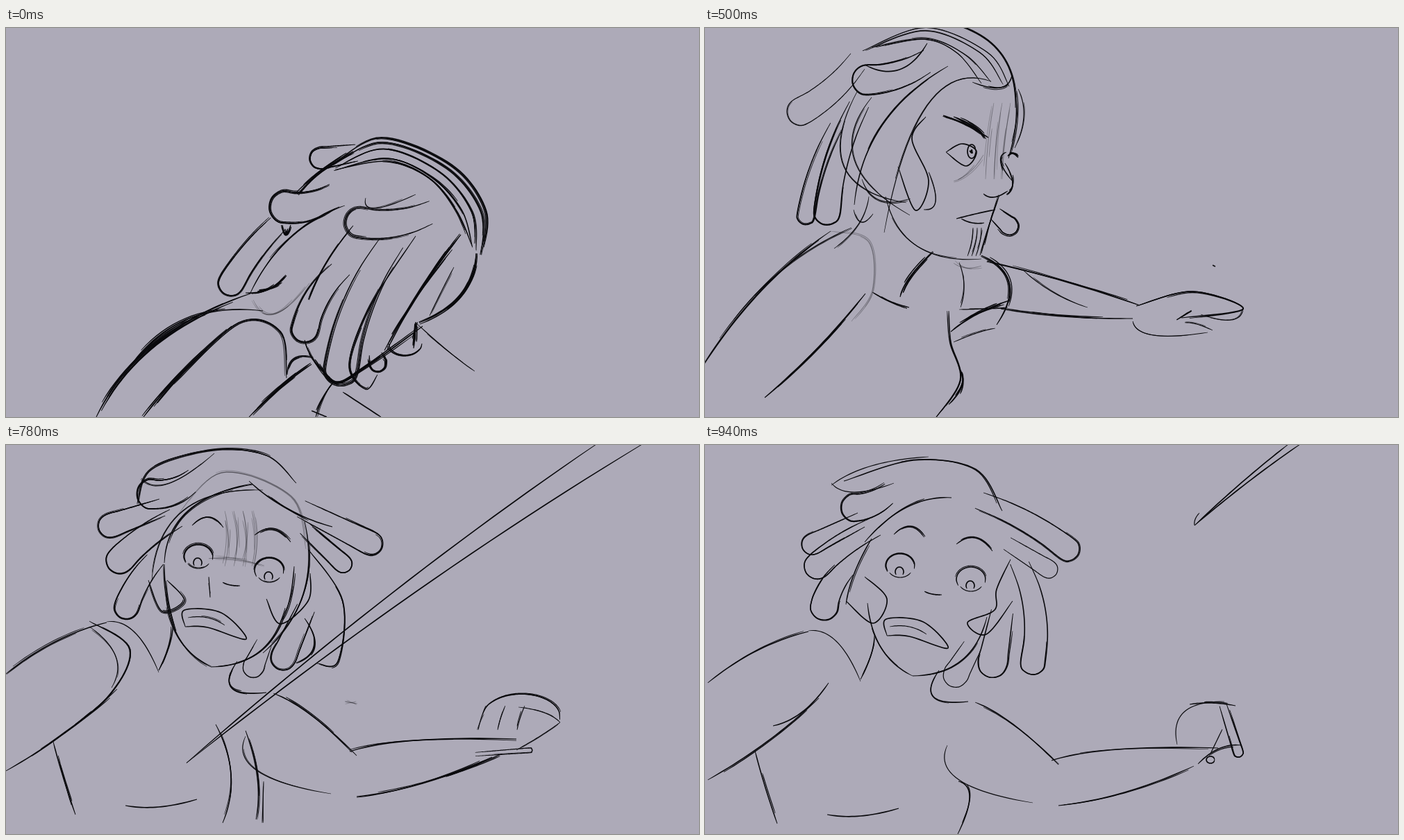
Animation, 998 px wide and 561 px high, one loop 980 ms. Source, as an HTML page with a canvas:

```html
<!DOCTYPE html>
<html lang="en">
<head>
<meta charset="utf-8">
<title>Rough sketch animation</title>
<style>
html, body { margin: 0; width: 100%; height: 100%; overflow: hidden; background: #adaab8; }
canvas { display: block; }
</style>
</head>
<body>
<canvas id="stage" width="998" height="561"></canvas>
<script>
const W = 998, H = 561, LOOP = 980;
const view = document.getElementById('stage').getContext('2d');
let g, seed, loose;

const lerp = (a, b, t) => a + (b - a) * t;
const rnd = (a = 0, b = 1) => {
  seed = (seed * 16807) % 2147483647;
  return lerp(a, b, seed / 2147483647);
};

// Smooth curve through x,y pairs: an arc for three points, a spline for more
function curve(p) {
  const out = [], last = p.length / 2 - 1;
  if (last === 2) {
    for (let i = 0; i <= 24; i++) {
      const t = i / 24, a = (1 - t) * (1 - 2 * t), b = 4 * t * (1 - t), c = t * (2 * t - 1);
      out.push([0, 1].map(j => a * p[j] + b * p[j + 2] + c * p[j + 4]));
    }
    return out;
  }
  const at = (i, j) => p[2 * Math.max(0, Math.min(last, i)) + j];
  for (let i = 0; i < last; i++)
    for (let s = 0; s < 12; s++) {
      const t = s / 12;
      out.push([0, 1].map(j => {
        const a = at(i - 1, j), b = at(i, j), c = at(i + 1, j), d = at(i + 2, j);
        return b + t / 2 * (c - a + t * (2 * a - 5 * b + 4 * c - d + t * (3 * (b - c) + d - a)));
      }));
    }
  out.push([at(last, 0), at(last, 1)]);
  return out;
}

// Moves each point sideways by offset(i)
function shiftSide(c, offset) {
  return c.map(([x, y], i) => {
    const a = c[Math.max(0, i - 1)], b = c[Math.min(c.length - 1, i + 1)];
    const dx = b[0] - a[0], dy = b[1] - a[1], d = offset(i) / (Math.hypot(dx, dy) || 1);
    return [x - dy * d, y + dx * d];
  });
}

// A line that is thin at both ends, like a pressed pen
function stroke(c, w) {
  const n = c.length - 1;
  const r = i => Math.max(w, 1) / 2 * (.5 + .5 * Math.min(1, 3 * Math.sin(Math.PI * i / n)));
  g.fillStyle = `rgba(9,9,12,${Math.min(1, w * .85)})`;
  g.beginPath();
  shiftSide(c, r).concat(shiftSide(c, i => -r(i)).reverse()).forEach(q => g.lineTo(...q));
  g.fill();
}

// A pen goes over the line once, then retraces random stretches of it
const pen = (w, passes, spread) => (...p) => {
  const c = curve(p), n = c.length - 1;
  stroke(c, w);
  for (let i = 0; i < Math.round(passes * loose); i++) {
    const part = c.slice(Math.floor(rnd(0, .35) * n), Math.ceil(rnd(.65, 1) * n) + 1);
    const a = rnd(-spread, spread), b = rnd(-spread, spread);
    stroke(shiftSide(part, j => lerp(a, b, j / part.length)), w * rnd(.6, .9));
  }
};
const clean = pen(1.7, 0, 0), thin = pen(1.2, 1, 2), firm = pen(1.6, 2, 2.6);
const heavy = pen(2, 4, 3.5), faint = pen(.4, 3, 4);

// Round-ended lock of hair from its root to its tip
function lock(ink, x0, y0, x1, y1, width, bend = 0) {
  const len = Math.hypot(x1 - x0, y1 - y0), ux = (x1 - x0) / len, uy = (y1 - y0) / len;
  const h = width / 2, end = len - h, pts = [];
  const put = (along, side) => pts.push(x0 + ux * along - uy * side, y0 + uy * along + ux * side);
  const edge = (t, s) => put(t * end, 4 * bend * t * (1 - t) + s * h * (.75 + .25 * t));
  for (let t = 0; t < 1; t += .25) edge(t, 1);
  for (let a = 0; a <= 4; a++) put(end + h * Math.sin(a * Math.PI / 4), h * Math.cos(a * Math.PI / 4));
  for (let t = .75; t >= 0; t -= .25) edge(t, -1);
  ink(...pts);
}

// Part of an ellipse; from and to are in turns
function ring(ink, x, y, rx, ry, from = 0, to = 1) {
  const pts = [];
  for (let i = 0; i <= 8; i++) {
    const a = lerp(from, to, i / 8) * 2 * Math.PI;
    pts.push(x + rx * Math.cos(a), y + ry * Math.sin(a));
  }
  ink(...pts);
}

// Lines running between two edges, closer together near the edges
function band(ink, n, outer, inner) {
  for (let i = 0; i < n; i++) {
    const u = i / (n - 1), t = u * u * (3 - 2 * u);
    ink(...outer.map((v, j) => lerp(v, inner[j], t) + rnd(-2, 2)));
  }
}

function shifted(dx, dy, ...parts) {
  g.save();
  g.translate(dx, dy);
  parts.forEach(draw => draw());
  g.restore();
}

function bowedLow() {
  band(firm, 5, [470,198, 540,158, 640,198, 690,265, 686,328], [475,205, 550,194, 610,218, 650,262, 670,315]);
  heavy(420,240, 455,207, 500,178);
  lock(firm, 505,180, 437,190, 32);
  lock(firm, 470,243, 380,264, 48, -6);
  lock(firm, 392,282, 313,382, 36, 4);
  firm(352,382, 408,304, 488,256);
  heavy(398,284, 403,298, 410,284);
  heavy(345,382, 378,377, 404,357);
  faint(356,392, 388,412, 437,368);
  lock(firm, 612,266, 488,284, 44, -8);
  thin(518,245, 532,260, 590,240);
  firm(500,285, 462,338, 436,392);
  lock(firm, 482,348, 420,451, 40, 8);
  lock(firm, 555,310, 473,513, 48, 12);
  firm(590,300, 525,400, 494,485, 518,521, 535,500);
  heavy(655,298, 597,378, 545,465);
  thin(645,345, 628,378, 610,415);
  heavy(677,325, 655,385, 595,425);
  heavy(445,478, 475,512, 520,488, 600,430);
  ring(firm, 575,455, 24,17, 0, .5);
  heavy(587,462, 589,440, 590,424);
  thin(590,425, 638,467, 675,495);
  lock(firm, 532,470, 538,495, 24);
  firm(430,450, 445,482, 475,512);
  heavy(130,561, 215,455, 352,383);
  firm(165,510, 250,425, 370,408);
  heavy(198,561, 255,495, 325,430);
  firm(240,512, 335,425, 395,438, 404,505);
  heavy(350,561, 397,517, 440,485);
  firm(405,500, 415,477, 442,476);
  firm(470,512, 456,535, 446,561);
  clean(485,525, 540,561);
  clean(440,552, 462,561);
}

function bowedHigh() {
  band(firm, 6, [415,122, 510,112, 598,160, 630,230, 622,258], [418,150, 495,138, 560,166, 600,212, 608,245]);
  heavy(415,118, 418,142, 455,148);
  clean(567,137, 570,125, 577,119, 600,118);
  clean(530,350, 548,358, 567,363);
  clean(567,363, 567,386);
  firm(455,150, 425,160, 402,176);
  lock(firm, 425,180, 334,196, 42, -6);
  lock(firm, 352,225, 304,342, 32, 10);
  heavy(316,322, 335,270, 372,222);
  firm(347,325, 375,290, 400,258);
  firm(416,206, 393,285, 397,368);
  heavy(290,334, 312,342, 338,336);
  heavy(297,355, 310,345, 328,338);
  lock(firm, 545,210, 424,230, 44, -10);
  lock(thin, 525,208, 434,230, 32, -8);
  heavy(446,285, 426,340, 398,372);
  lock(thin, 480,262, 442,424, 36, 8);
  lock(heavy, 540,252, 494,432, 40, 10);
  heavy(582,248, 538,330, 512,420);
  firm(615,255, 590,328, 522,390);
  heavy(388,342, 396,372, 412,360);
  heavy(395,365, 408,398, 430,428);
  firm(408,402, 438,438, 475,426);
  lock(firm, 525,370, 527,403, 18);
  heavy(375,458, 392,428, 420,408);
  firm(411,425, 407,490, 408,561);
  heavy(68,561, 150,455, 320,340);
  firm(240,388, 275,372, 308,345);
  heavy(130,561, 205,460, 290,380);
  firm(235,430, 315,368, 362,395, 345,480);
  heavy(250,561, 298,518, 345,478);
  firm(455,450, 505,500, 568,545);
  thin(472,470, 550,536, 640,561);
  firm(415,497, 480,527, 552,553);
}

function reach() {
  firm(0,485, 85,375, 185,290);
  thin(45,418, 122,340, 215,285);
  faint(185,290, 240,305, 245,375, 215,420);
  heavy(90,530, 163,462, 235,380);
  thin(240,240, 225,280, 190,315);
  heavy(285,385, 300,355, 333,320);
  firm(245,378, 270,391, 298,400);
  thin(370,335, 377,368, 372,400);
  firm(355,405, 358,450, 372,505, 335,561);
  heavy(370,488, 374,512, 355,540);
  heavy(402,325, 442,365, 424,425);
  heavy(358,435, 395,410, 442,390);
  thin(370,403, 405,402, 440,400);
  thin(362,450, 395,437, 422,430);
  faint(362,336, 380,343, 402,340);
  firm(410,333, 520,362, 630,397);
  thin(462,346, 505,378, 555,400);
  firm(430,402, 520,413, 620,416);
  firm(625,398, 706,377, 779,402, 690,415);
  thin(779,402, 762,418, 718,410);
  thin(620,420, 650,440, 728,436);
  thin(735,433, 712,424, 695,422);
  firm(683,418, 705,405);
  clean(735,339, 739,341);
}

function profile() {
  heavy(347,123, 380,137, 412,155);
  heavy(362,125, 392,140, 408,157);
  heavy(440,182, 447,178, 455,184);
  firm(438,176, 430,190, 446,217);
  firm(436,192, 447,220, 438,237);
  clean(405,236, 420,241, 440,232);
  firm(428,238, 412,285, 400,325);
  for (let x = 382; x < 398; x += 6) thin(x,326, x + 6,305, x + 8,285);
  for (let x = 412; x < 445; x += 12) faint(x + 8,105, x,160, x - 4,215);
  faint(362,218, 385,205, 405,180);
  thin(455,85, 463,125, 450,170);
  firm(449,80, 452,130, 441,185);
  thin(230,215, 255,245, 300,243);
  thin(264,240, 310,312, 402,330);
}

function glance() {
  reach();
  profile();
  band(firm, 4, [375,-8, 440,45, 452,105], [330,2, 390,30, 420,78]);
  thin(250,2, 350,10, 412,75);
  firm(398,70, 430,82, 437,66, 455,95);
  thin(245,10, 295,20, 345,-3);
  thin(325,18, 265,62, 230,50);
  thin(220,65, 290,92, 370,36);
  heavy(252,0, 228,25, 208,58);
  thin(170,78, 200,70);
  thin(112,80, 165,86, 218,48);
  lock(firm, 215,72, 118,116, 36, -8);
  lock(firm, 205,105, 157,281, 28, 8);
  thin(222,90, 182,200, 182,285);
  lock(firm, 380,60, 234,279, 34, 24);
  thin(250,70, 205,180, 300,265);
  faint(275,70, 232,160, 255,245);
  firm(306,148, 285,210, 245,275);
  clean(308,140, 305,185, 340,235, 328,262, 288,240, 278,205);
  thin(260,240, 265,265, 262,292);
  ring(clean, 373,175, 21,18, .5, 1.55);
  ring(clean, 386,173, 7,12);
  heavy(387,164, 387,176);
  thin(372,267, 400,272, 425,258);
  lock(thin, 412,264, 459,287, 24);
  thin(402,85, 405,112);
}

function glare() {
  shifted(-4, 3, reach, profile);
  band(thin, 4, [225,35, 320,0, 405,35, 440,85], [245,28, 315,18, 365,38, 400,78]);
  firm(365,-3, 428,40, 447,115);
  firm(385,78, 425,86, 442,68);
  clean(320,22, 280,60, 230,53);
  lock(firm, 320,48, 213,82, 44, -6);
  lock(thin, 220,48, 123,134, 40, -6);
  lock(firm, 190,140, 141,283, 26, 6);
  lock(firm, 222,110, 170,283, 38, 8);
  firm(350,55, 255,140, 215,255);
  thin(242,268, 225,280, 214,262);
  thin(220,90, 200,200, 290,252);
  thin(240,100, 215,190, 295,270);
  thin(412,77, 320,112, 258,295);
  clean(318,128, 298,160, 322,220, 303,263, 278,200);
  thin(322,208, 332,250, 315,262);
  clean(347,179, 370,167, 391,178, 376,199, 347,179);
  ring(clean, 384,178, 6,10);
  heavy(384,175, 385,181);
  clean(362,275, 390,268, 418,262);
  clean(369,275, 385,281, 402,281);
  lock(firm, 418,268, 448,294, 26);
}

function eye(x, y) {
  ring(firm, x, y, 21, 18, .42, 1.04);
  ring(thin, x, y, 19, 17, .1, .4);
  ring(clean, x - 1, y + 9, 6, 7, .4, 1.1);
}

// Face, neck and arms of the startled pose
function startled() {
  eye(277, 161);
  eye(379, 181);
  firm(268,116, 292,104, 313,119);
  firm(358,130, 385,121, 410,140);
  clean(312,198, 323,202, 337,203);
  clean(258,262, 257,238, 310,242, 346,280, 290,263, 258,262);
  thin(262,249, 290,249, 315,260);
  firm(230,215, 250,280, 295,320);
  firm(295,320, 365,298, 402,235);
  firm(240,262, 235,290, 220,325);
  thin(145,255, 185,270, 220,328);
  firm(333,312, 325,350, 375,357);
  firm(0,330, 70,284, 145,256);
  firm(0,470, 85,415, 160,352);
  firm(68,428, 82,478, 100,533);
  clean(172,520, 220,522, 275,511);
  firm(385,358, 440,390, 505,448);
  firm(495,442, 590,426, 735,424);
  firm(505,507, 600,488, 700,450);
  thin(345,420, 362,470, 468,503);
}

function shock() {
  startled();
  firm(190,85, 210,35, 298,8, 375,15, 418,55);
  lock(firm, 268,52, 190,78, 44, -6);
  thin(195,48, 235,55, 300,12);
  lock(firm, 225,90, 134,122, 34);
  lock(firm, 245,105, 148,178, 40, 4);
  lock(firm, 215,165, 164,249, 36, 4);
  firm(355,57, 262,95, 228,170);
  thin(370,65, 255,95, 210,195);
  faint(240,110, 310,40, 410,75, 432,150);
  firm(350,52, 405,92, 470,118);
  lock(firm, 425,92, 541,150, 34);
  lock(firm, 430,120, 495,180, 26);
  firm(435,150, 485,225, 478,312, 448,315);
  firm(430,110, 428,215, 370,300);
  firm(205,195, 225,240, 257,225, 232,195);
  clean(375,222, 395,258, 435,225, 438,185);
  lock(firm, 432,235, 392,323, 36);
  lock(thin, 372,285, 350,334, 30);
  firm(430,250, 444,290, 418,315);
  firm(228,172, 232,220, 245,268);
  firm(415,175, 408,225, 395,255);
  for (let x = 315; x < 360; x += 13) faint(x,95, x + 5,135, x,175);
  faint(292,164, 330,165, 372,174);
  thin(292,190, 294,220);
  firm(120,254, 178,295, 145,365, 60,432);
  thin(120,262, 158,305, 152,350);
  firm(302,403, 324,475, 312,545);
  firm(345,412, 362,480, 360,540);
  thin(371,485, 369,545);
  ring(firm, 742,392, 56,33, .52, 1.02);
  thin(738,378, 775,386, 798,400);
  thin(798,400, 772,418, 735,440);
  lock(thin, 676,446, 758,440, 7);
  for (let x = 685; x < 750; x += 28) thin(x + 6,376, x - 1,395, x - 5,411);
  firm(618,482, 665,466, 715,445);
  faint(488,370, 506,373);
}

function recoil() {
  shifted(4, 13, startled);
  firm(200,52, 300,22, 390,35, 428,95);
  thin(182,58, 240,30, 322,17);
  thin(182,55, 215,68, 272,55);
  lock(firm, 265,70, 198,98, 40, -4);
  lock(firm, 225,108, 141,150, 30);
  lock(firm, 245,118, 146,185, 38, 4);
  firm(230,140, 290,90, 355,76);
  lock(firm, 200,180, 162,250, 40, 4);
  firm(240,135, 215,185, 203,230);
  lock(firm, 395,80, 537,158, 34, -6);
  lock(thin, 435,142, 506,186, 26);
  lock(firm, 453,170, 475,331, 36, -12);
  clean(230,190, 262,222, 242,257, 203,225);
  clean(440,165, 420,208, 417,238, 378,256, 405,273, 443,225);
  lock(firm, 428,240, 410,335, 42);
  lock(thin, 385,290, 352,347, 36);
  clean(98,405, 140,385, 178,343);
  firm(365,485, 381,508, 364,561);
  thin(680,432, 690,385, 748,370);
  firm(698,374, 730,372, 764,376);
  lock(firm, 746,375, 770,450, 14);
  firm(772,433, 740,438, 710,460);
  ring(clean, 728,454, 6,5);
  thin(745,410, 728,445);
}

// Two edges running from the top of the stage, slightly bowed, to one point
function blade(x, y, ...tops) {
  tops.forEach(top => clean(top,-1, (top + x) / 2, y / 2 - .02 * Math.hypot(top - x, y), x,y));
}

// u = 0: point at the shoulder, u = 1: across the body
const thrust = u => () => {
  blade(lerp(405, 115, u), lerp(356, 561, u), lerp(848, 852, u), lerp(898, 934, u));
  if (u < 1) return;
  thin(740,90, 690,117, 630,162);
  thin(820,92, 765,124, 710,153);
};

function tip() {
  blade(705, 116, 840, 857);
  thin(705,116, 706,107, 712,98);
}

function scene(start, looseness, ...parts) {
  const art = document.createElement('canvas');
  art.width = W;
  art.height = H;
  g = art.getContext('2d');
  g.fillStyle = '#adaab8';
  g.fillRect(0, 0, W, H);
  seed = 4711;
  loose = looseness;
  parts.forEach(draw => draw());
  return { start, art };
}

const scenes = [
  scene(0, 1.4, bowedLow),
  scene(100, 1.4, bowedHigh),
  scene(300, 1, glance),
  scene(500, .8, glare),
  ...[0, .5, 1, 1.3, -.4].map((u, i) => scene(i ? 740 + 40 * i : 700, 1, shock, thrust(u))),
  scene(940, .4, recoil, tip)
];

function show() {
  const t = performance.now() % LOOP;
  view.drawImage(scenes.filter(s => s.start <= t).pop().art, 0, 0);
  requestAnimationFrame(show);
}
show();
</script>
</body>
</html>
```
